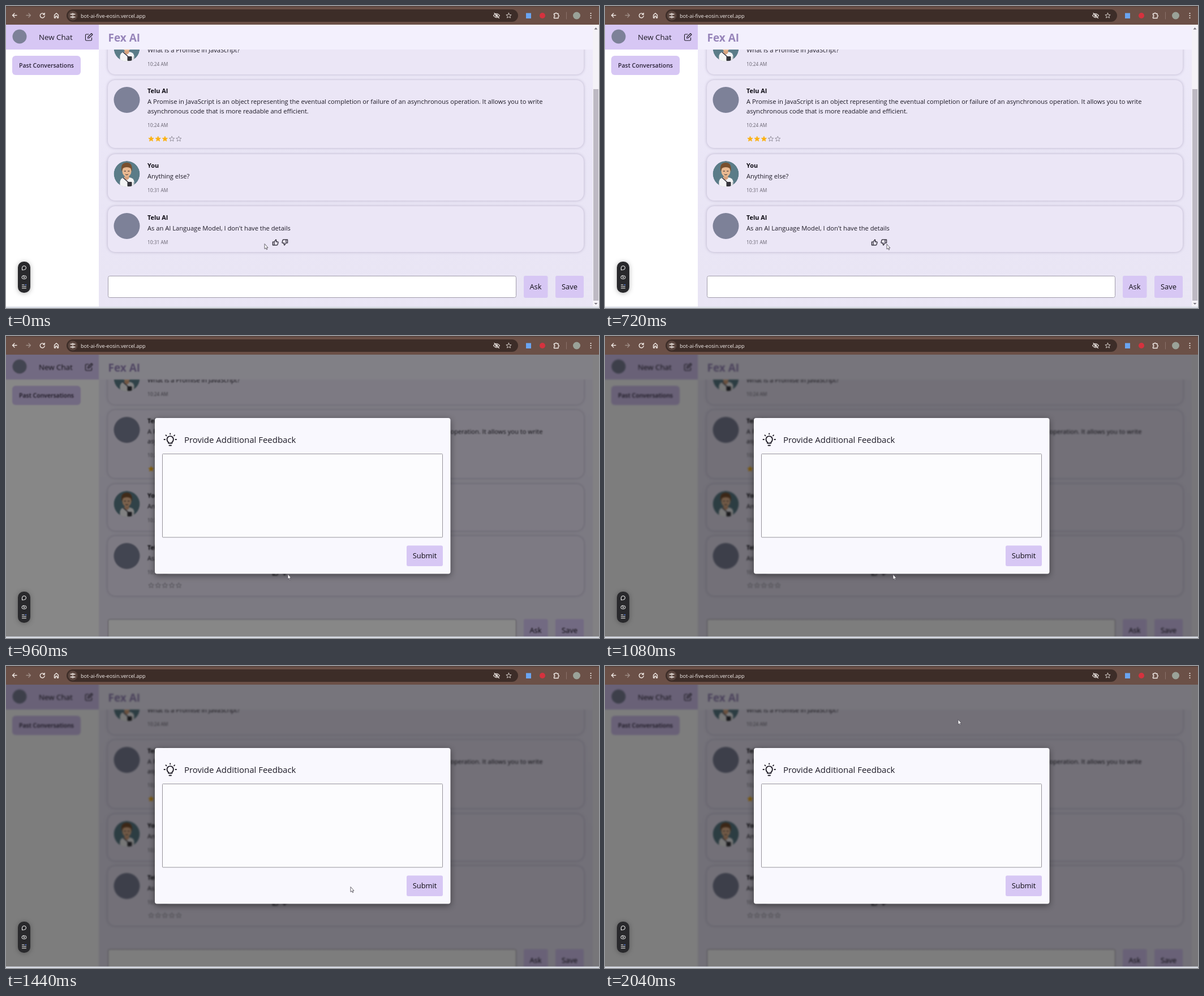
Animation, 1048 px wide and 534 px high, one loop 2160 ms. Source, as an HTML page:

```html
<!DOCTYPE html>
<html lang="en">
<head>
<meta charset="utf-8">
<title>Chat feedback</title>
<style>
  html, body { margin: 0; width: 100%; height: 100%; overflow: hidden; background: #fff; }
  svg { display: block; width: 1048px; height: 534px; }
  text { font-family: "Open Sans", "Noto Sans", sans-serif; font-size: 11.14px; fill: #1d1a26; }
  .name { font-size: 10.85px; font-weight: 700; fill: #0c0a12; }
  .time { font-size: 8.32px; fill: #66626f; }
  .button { font-size: 12.9px; font-weight: 500; text-anchor: middle; fill: #0e0c14; }
  .lilac { fill: #d7c7f4; }
  .card { fill: #ebe6f6; filter: drop-shadow(0 0 2.5px rgba(80, 65, 110, .33)); }
  .line { fill: none; stroke: #1f1c26; stroke-linecap: round; stroke-linejoin: round; }
  .chrome { fill: none; stroke: #f3ece8; stroke-width: 1.3; stroke-linecap: round; stroke-linejoin: round; }
  .logo { fill: #7d8198; }
  .gold { fill: #fbb214; stroke: #fbb214; }
  .empty { fill: none; stroke: #85818d; }
  .panel { filter: drop-shadow(0 3px 6px rgba(0, 0, 0, .45)); }
  .pill { filter: drop-shadow(0 1px 4px rgba(0, 0, 0, .3)); }
</style>
</head>
<body>
<svg viewBox="0 0 1048 534">
  <defs>
    <linearGradient id="backdrop" x2="0" y2="1">
      <stop stop-color="#efebfa"/><stop offset=".5" stop-color="#eae6f6"/><stop offset="1" stop-color="#e9e5f4"/>
    </linearGradient>
    <clipPath id="disc"><circle r="23"/></clipPath>
    <path id="star" stroke-width=".8" stroke-linejoin="round"
      d="M0-4.7 1.3-1.5 4.6-1.3 2.1.8 2.9 4.1 0 2.3-2.9 4.1-2.1.8-4.6-1.3-1.3-1.5Z"/>
    <path id="thumb" class="line" stroke-width="1.2"
      d="M-2-1 .8-4.8Q2-4.6 1.7-3L1.3-1.2H4.2Q5.2-1 5 0L4 3.8Q3.7 4.8 2.8 4.8H-2ZM-2-1H-4.6V4.8H-2"/>
    <g id="person" clip-path="url(#disc)">
      <circle r="23" fill="#5b7c88"/>
      <path d="M-12 24V13Q-11 7-3 6H4Q12 7 13 13V24Z" fill="#f3f3f4"/>
      <path d="M-4 2H4V8L0 11-4 8Z" fill="#d7a27c"/>
      <ellipse cy="-5" rx="8" ry="10" fill="#e9b991"/>
      <path d="M-9-4Q-12-20 0-20 11-20 9-4L7-10Q0-14-7-10Z" fill="#79502f"/>
      <path d="M-4.500-5H-2M2-5H4.500M-2 1Q0 2.500 2 1" class="line" stroke-width="1"/>
      <path d="M-6 7 4 16" class="line" stroke-width="1.2"/>
      <rect x="1" y="14" width="8" height="8" rx="1" fill="#34343a"/>
      <path d="M-12 24V14M12 24V14" stroke="#b7bbc2"/>
    </g>
  </defs>

  <g id="page">
    <rect x="-20" y="20" width="1090" height="540" fill="#fff"/>
    <rect x="164" y="20" width="873" height="540" fill="url(#backdrop)"/>

    <rect class="card" x="180" y="40" width="841" height="81" rx="13"/>
    <use href="#person" x="213.500" y="75"/>
    <text x="250" y="81.500">What is a Promise in JavaScript?</text>
    <text class="time" x="250" y="106">10:24 AM</text>

    <rect class="card" x="180" y="131" width="841" height="120" rx="13"/>
    <circle class="logo" cx="213.500" cy="166" r="23"/>
    <text class="name" x="250" y="154">Telu AI</text>
    <text x="250" y="173">A Promise in JavaScript is an object representing the eventual completion or failure of an asynchronous operation. It allows you to write</text>
    <text x="250" y="189.500">asynchronous code that is more readable and efficient.</text>
    <text class="time" x="250" y="214">10:24 AM</text>
    <g id="rated"></g>

    <rect class="card" x="180" y="262" width="841" height="82" rx="13"/>
    <use href="#person" x="213.500" y="297"/>
    <text class="name" x="250" y="285.500">You</text>
    <text x="250" y="304.500">Anything else?</text>
    <text class="time" x="250" y="329">10:31 AM</text>

    <rect class="card" id="lastCard" x="180" y="354" width="841" height="81" rx="13"/>
    <circle class="logo" cx="213.500" cy="389" r="23"/>
    <text class="name" x="250" y="377.500">Telu AI</text>
    <text x="250" y="396.500">As an AI Language Model, I don't have the details</text>
    <text class="time" x="250" y="421">10:31 AM</text>
    <use href="#thumb" x="476" y="418"/>
    <use href="#thumb" transform="translate(493 418) rotate(180)"/>
    <g id="unrated"></g>

    <g id="composer">
      <rect x="180.500" y="477.500" width="721" height="38" rx="3" fill="#fff" stroke="#a19cab"/>
      <rect class="lilac" x="915" y="477" width="42.500" height="39" rx="3"/>
      <rect class="lilac" x="971" y="477" width="50" height="39" rx="3"/>
      <text class="button" x="936" y="501">Ask</text>
      <text class="button" x="996" y="501">Save</text>
    </g>

    <rect x="164" y="20" width="873" height="57" fill="#f3f0fd"/>
    <text x="180.500" y="62.500" style="font-size:19px;font-weight:700;fill:#9785ba">Fex AI</text>
    <rect class="lilac" x="-20" y="20" width="184" height="57"/>
    <circle class="logo" cx="24" cy="54" r="12.500"/>
    <text x="58" y="60" style="font-size:13.3px">New Chat</text>
    <path class="line" stroke-width="1.1" d="M146 50H142Q140.500 50 140.500 51.500V59.500Q140.500 61 142 61H150Q151.500 61 151.500 59.500V56M144.500 57 145 54.500 151 48.500 153 50.500 147 56.500Z"/>
    <rect class="lilac" x="11" y="88" width="121" height="34" rx="6"/>
    <text x="71.500" y="108.500" text-anchor="middle" style="font-size:10.5px;font-weight:600;fill:#2a2337">Past Conversations</text>

    <rect x="1037" y="20" width="40" height="540" fill="#f4f2f7"/>
    <g id="scrollbar">
      <rect x="1038" y="147" width="9" height="374" fill="#bdb9c3"/>
      <path d="M1039.500 41.500 1042.500 38 1045.500 41.500ZM1039.500 525 1042.500 528 1045.500 525Z" fill="#77737c"/>
    </g>
  </g>

  <rect id="dim" y="33" width="1048" height="499"/>

  <g id="modal">
    <rect class="panel" x="263" y="145" width="522.500" height="275.500" rx="4" fill="#f9f8fe"/>
    <g class="line" stroke-width="1.9">
      <path d="M287 189.500V188Q284.500 186 284.500 182.800A5.700 5.700 0 0 1 295.900 182.800Q295.900 186 293.400 188V189.500Z"/>
      <path d="M288.500 193.500H292M290.200 172.500V173.500M279.500 183H281M299.500 183H301M282.500 175.300 283.500 176.300M298 175.300 297 176.300"/>
    </g>
    <text x="315" y="188.500" style="font-size:14.97px">Provide Additional Feedback</text>
    <rect x="276.500" y="208.500" width="495" height="147.500" rx="1" fill="#fcfcfe" stroke="#96949b"/>
    <rect class="lilac" x="708" y="370.500" width="64" height="36.500" rx="3"/>
    <text class="button" x="740" y="393">Submit</text>
  </g>

  <g>
    <rect class="pill" x="21" y="452" width="22" height="55" rx="10" fill="#29292c"/>
    <g fill="none" stroke="#fff" stroke-linecap="round">
      <path d="M28.500 466.500V463A3.500 3.500 0 1 1 32 466.500Z"/>
      <rect x="28" y="477" width="8" height="5.500" rx="2.700"/>
      <circle cx="32" cy="479.700" r=".8"/>
      <path d="M28.500 493H32M28.500 496H35.500M28.500 499H35.500"/>
      <path d="M34.500 493H35.500" stroke="#5f8dff" stroke-width="1.5"/>
    </g>
  </g>

  <rect width="1048" height="33" fill="#6b5047"/>
  <rect width="1048" height="1.500" fill="#54403a"/>
  <rect x="107" y="6" width="798" height="22" rx="11" fill="#3d2d28"/>
  <circle cx="118" cy="17" r="8.500" fill="#59453e"/>
  <text x="132" y="20.500" style="font-size:9.14px;fill:#f4eeeb">bot-ai-five-eosin.vercel.app</text>
  <g class="chrome">
    <path d="M19 16.500H11.500M15 13 11.500 16.500 15 20"/>
    <path d="M36 16.500H43.500M40 13 43.500 16.500 40 20" stroke="#a08e87"/>
    <path d="M67.500 14.500A4 4 0 1 0 68.300 17.500M68.200 12.500V15H65.500"/>
    <path d="M85.500 16 89 12.800 92.500 16V21H90.500V18H87.500V21H85.500Z"/>
    <path d="M114 14.500H116M120 14.500H122M114 19.500H116M120 19.500H122"/>
    <circle cx="118" cy="14.500" r="1.300"/><circle cx="118" cy="19.500" r="1.300"/>
    <path d="M861.500 17Q867 10 872.500 17 867 24 861.500 17ZM863 12.500 871.500 21.500" stroke-width="1.1"/>
    <circle cx="867" cy="17" r="1.600"/>
    <use href="#star" x="888.500" y="17"/>
    <path d="M968.500 13.500H970.800A1.300 1.300 0 0 1 973.400 13.500H976V16.200A1.300 1.300 0 0 1 976 18.800V21.500H968.500V19A1.500 1.500 0 0 0 968.500 16Z"/>
    <path d="M990.500 11V23" stroke="#8b726a" stroke-width="1"/>
  </g>
  <rect x="919" y="12.500" width="9" height="9.500" fill="#6aa5f2"/>
  <circle cx="948" cy="17" r="5" fill="#d5323e"/>
  <circle cx="1008.500" cy="17" r="6.500" fill="#9aa298"/>
  <g fill="#f3ece8"><circle cx="1033.500" cy="13" r="1.100"/><circle cx="1033.500" cy="17" r="1.100"/><circle cx="1033.500" cy="21" r="1.100"/></g>
  <rect y="531.500" width="1048" height="2.500" fill="#d9dde6"/>

  <path id="cursor" d="M0 0V9L2 7.300 3.500 10.300 4.800 9.700 3.400 6.800H6Z" fill="#fff" stroke="#55525c" stroke-width=".9" stroke-linejoin="round"/>
</svg>
<script>
  const $ = id => document.getElementById(id);
  const LOOP = 2160, TICK = 120, OPEN = 7;

  // tick, x, y
  const path = [[0, 457, 420.5], [6, 498, 421], [8, 498, 421], [9, 509, 421.5], [12, 609, 390.5], [17, 624, 94.5]];
  const fade = [{ dim: .27, blur: .3 }, { dim: .47, blur: .9 }, { dim: .51, blur: 1.7 }];

  function stars(id, y, filled) {
    $(id).innerHTML = Array.from({ length: 5 }, (_, i) =>
      `<use href="#star" x="${256.5 + i * 12.2}" y="${y}" class="${i < filled ? 'gold' : 'empty'}"/>`).join('');
  }

  function cursorAt(tick) {
    const i = Math.max(1, path.findIndex(p => p[0] >= tick));
    const [t0, x0, y0] = path[i - 1], [t1, x1, y1] = path[i];
    const u = (tick - t0) / (t1 - t0), k = u * u * (3 - 2 * u);
    return [x0 + (x1 - x0) * k, y0 + (y1 - y0) * k];
  }

  function draw(tick) {
    const open = tick >= OPEN;
    const { dim, blur } = open ? fade[Math.min(tick - OPEN, 2)] : { dim: 0, blur: 0 };
    const show = (id, on) => $(id).style.display = on ? '' : 'none';
    show('modal', open);
    show('unrated', open);
    show('scrollbar', !open);
    $('lastCard').setAttribute('height', open ? 105 : 81);
    $('composer').setAttribute('transform', `translate(0 ${open ? 23.5 : 0})`);
    $('dim').style.opacity = dim;
    $('page').style.filter = blur ? `blur(${blur}px)` : 'none';
    $('cursor').setAttribute('transform', `translate(${cursorAt(tick)})`);
  }

  stars('rated', 235, 3);
  stars('unrated', 441, 0);

  let start, last = 0;
  function frame(now) {
    start ??= now;
    const tick = Math.floor((now - start) % LOOP / TICK);
    if (tick !== last) draw(last = tick);
    requestAnimationFrame(frame);
  }
  draw(0);
  requestAnimationFrame(frame);
</script>
</body>
</html>
```
